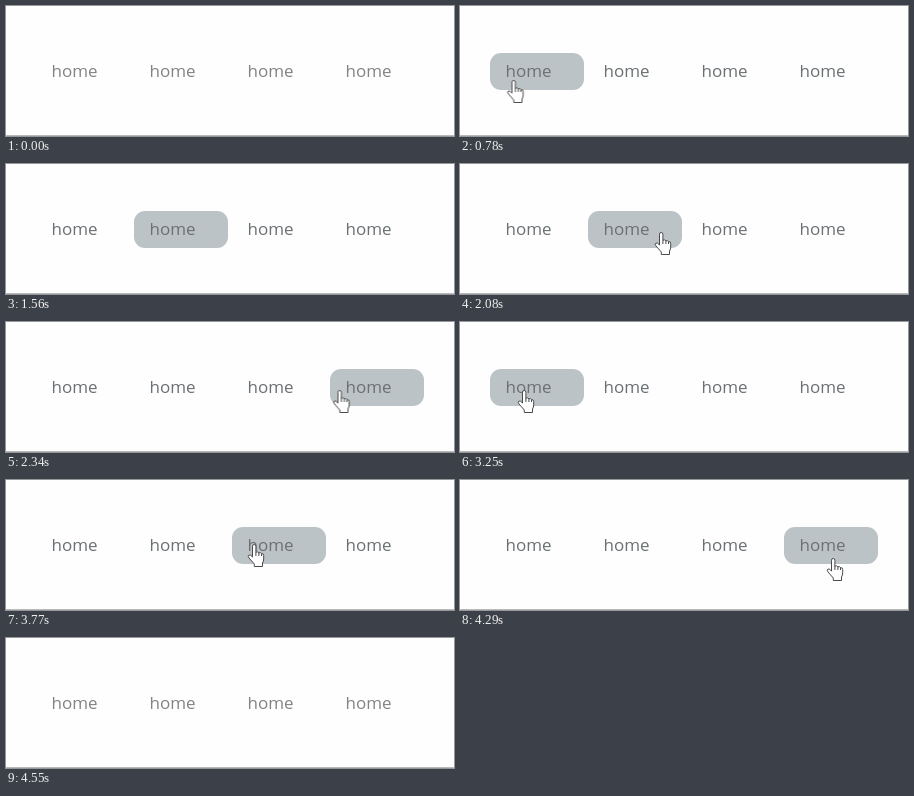
Recreate the animation shown at these times as an HTML page. Size 448 by 130 pixels, loop 5.2 s.

```html
<!DOCTYPE html>
<html lang="en">
<head>
<meta charset="utf-8">
<title>Menu hover</title>
<style>
  html, body {
    margin: 0;
    width: 100%;
    height: 100%;
    overflow: hidden;
    background: #fefefe;
  }
  .stage {
    position: relative;
    width: 448px;
    height: 130px;
    overflow: hidden;
    --pitch: 98px;
  }
  .stage::after {
    content: "";
    position: absolute;
    left: 0;
    right: 0;
    top: 129px;
    height: 1px;
    background: #b9b9b9;
  }
  nav, .pill, .hand {
    animation: 5.2s step-end -4ms infinite;
  }
  nav {
    position: absolute;
    inset: 0;
    font: 17px/24px "Open Sans", "Noto Sans", sans-serif;
    animation-name: tint;
  }
  nav span {
    position: absolute;
    top: 53px;
    left: calc(45.5px + var(--i) * var(--pitch));
  }
  .pill {
    position: absolute;
    left: 29.5px;
    top: 47px;
    width: 94.5px;
    height: 36.5px;
    border-radius: 11px;
    background: #bcc3c6;
    animation-name: hover;
  }
  .hand {
    position: absolute;
    z-index: 1;
    left: 0;
    top: 0;
    width: 18px;
    height: 24px;
    overflow: visible;
    fill: #fff;
    stroke: #4a4a4a;
    stroke-linejoin: round;
    animation-name: point;
  }

  @keyframes tint {
    0%, 87.5%, 100% { color: #828484; }
    10% { color: #6b7073; }
  }

  /* One step is 2.5% = 130 ms */
  @keyframes hover {
    0%, 85%, 100% { opacity: 0; transform: none; }
    10%, 62.5% { opacity: 1; transform: none; }
    27.5%, 40%, 57.5%, 70% { opacity: 1; transform: translateX(var(--pitch)); }
    42.5%, 55%, 72.5% { opacity: 1; transform: translateX(calc(2 * var(--pitch))); }
    45%, 52.5%, 77.5% { opacity: 1; transform: translateX(calc(3 * var(--pitch))); }
  }
  @keyframes point {
    0%, 30%, 87.5%, 100% { visibility: hidden; transform: translate(40px, 130px); }
    7.5% { visibility: visible; transform: translate(40px, 107px); }
    10% { visibility: visible; transform: translate(41px, 92px); }
    15% { visibility: visible; transform: translate(46.5px, 74px); }
    20% { visibility: visible; transform: translate(52px, 74px); }
    27.5% { visibility: visible; transform: translate(132px, 76px); }
    40% { visibility: visible; transform: translate(194px, 68px); }
    42.5% { visibility: visible; transform: translate(258px, 68px); }
    45% { visibility: visible; transform: translate(326.5px, 68px); }
    47.5% { visibility: visible; transform: translate(352px, 68px); }
    50% { visibility: visible; transform: translate(358px, 68px); }
    52.5% { visibility: visible; transform: translate(330px, 70px); }
    55% { visibility: visible; transform: translate(258px, 75px); }
    57.5% { visibility: visible; transform: translate(164px, 76px); }
    60% { visibility: visible; transform: translate(88px, 72px); }
    62.5% { visibility: visible; transform: translate(57px, 68px); }
    70% { visibility: visible; transform: translate(152px, 67px); }
    72.5% { visibility: visible; transform: translate(241px, 64px); }
    77.5% { visibility: visible; transform: translate(326px, 66px); }
    80% { visibility: visible; transform: translate(356px, 70px); }
    82.5% { visibility: visible; transform: translate(366px, 78px); }
    85% { visibility: visible; transform: translate(372px, 106px); }
  }
</style>
</head>
<body>
<div class="stage">
  <div class="pill"></div>
  <nav>
    <span style="--i:0">home</span>
    <span style="--i:1">home</span>
    <span style="--i:2">home</span>
    <span style="--i:3">home</span>
  </nav>
  <svg class="hand" viewBox="0 0 18 24">
    <path d="M5.5 13V2.2a1.7 1.7 0 0 1 3.4 0V8.2q1.9-1 3 .6 1.9-.6 2.6.8 2.2-.3 2.2 1.8V15q0 2-1.2 4v3.5H7.3V20L2 14q-1.6-2 0-3 1.4-.6 3.5 2z"/>
    <path d="M8.9 8v4M11.9 8.8V12M14.5 9.6V12" fill="none"/>
  </svg>
</div>
</body>
</html>
```
